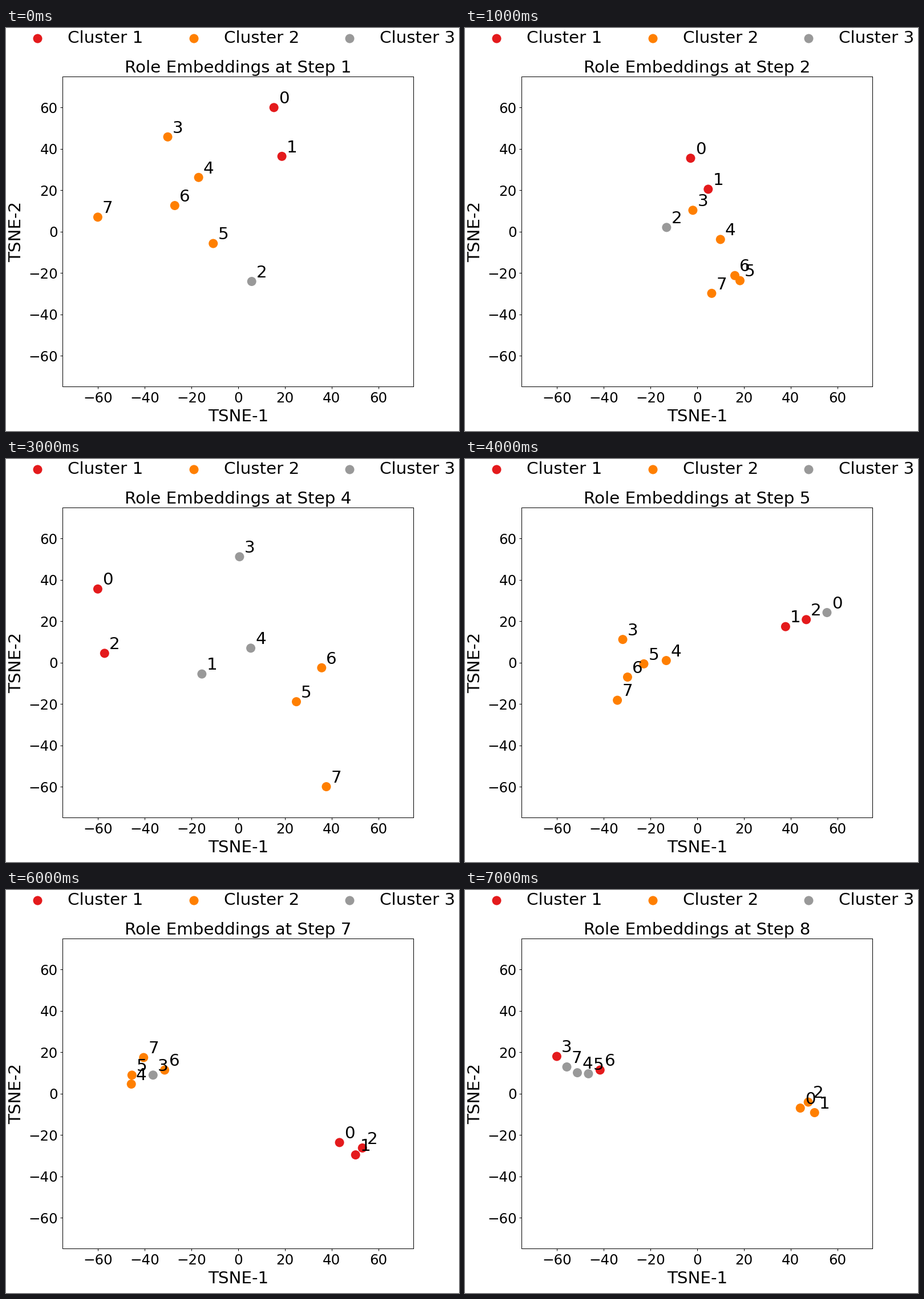
Animation, 794 px wide and 706 px high, one loop 8000 ms. Source, as a matplotlib script:

```python
import matplotlib.pyplot as plt
import numpy as np
from matplotlib.animation import FuncAnimation

W, H = 794, 706
DPI = 72  # one point equals one pixel
BIG, SMALL = 29.4, 24.5
DOT = 16 ** 2
COLORS = {"1": "#e41a1c", "2": "#ff7f00", "3": "#999999"}
N_STEPS = 8
DRIFT = 0.55  # how far a step without its own layout lies between its neighbours

# Per step: cluster of each role, then chains of roles spread evenly
# along the line or parabola through a few key points
LAYOUTS = {
    1: ("11322222", {"01": [(15.3, 60), (18.7, 36.4)],
                     "256": [(5.8, -24.1), (-27.1, 12.6)],
                     "43": [(-16.9, 26.2), (-30.1, 45.8)],
                     "7": [(-60, 7)]}),
    3: ("22233311", {"201": [(-28.5, 23.4), (-6.7, 7.5)],
                     "34567": [(21.3, -18.7), (42, -38.4), (60.4, -60)]}),
    4: ("13133222", {"02": [(-60, 35.6), (-57.1, 4.5)],
                     "14": [(-15.5, -5.5), (5.4, 7)],
                     "56": [(24.9, -18.9), (35.7, -2.5)],
                     "3": [(0.6, 51.2)],
                     "7": [(37.7, -60)]}),
    5: ("31122222", {"120": [(37.8, 17.4), (55.5, 24.2)],
                     "4567": [(-13.2, 1), (-26.6, -3.2), (-34.1, -18.2)],
                     "3": [(-31.8, 11.2)]}),
    6: ("11132222", {"012": [(42.4, -44), (50.2, -54.6), (60, -53.4)],
                     "54": [(-44.1, 8.1), (-38.9, -2.1)],
                     "763": [(-21.7, 23), (-19.1, 11.4), (-7.5, -2.1)]}),
    8: ("22213313", {"37456": [(-60, 18), (-51.2, 10.1), (-41.5, 11.4)],
                     "021": [(44.1, -7), (47.5, -4.1), (50.2, -9.2)]}),
}


def chain(keys, count):
    """Evenly spaced points on the polynomial curve through the keys."""
    basis = np.vander(np.linspace(0, 1, len(keys)))
    return np.vander(np.linspace(0, 1, count), len(keys)) @ np.linalg.solve(basis, keys)


def layout(step):
    """Clusters and positions of all roles at one step."""
    if step not in LAYOUTS:
        clusters, before = layout(step - 1)
        after = layout(step + 1)[1]
        return clusters, before + DRIFT * (after - before)
    clusters, chains = LAYOUTS[step]
    points = np.zeros((len(clusters), 2))
    for roles, keys in chains.items():
        points[[int(r) for r in roles]] = chain(keys, len(roles))
    return clusters, points


fig = plt.figure(figsize=(W / DPI, H / DPI), dpi=DPI, facecolor="white")


def put_text(x, y, text, **style):
    """Place text with its baseline at a pixel position from the top left."""
    return fig.text(x / W, 1 - y / H, text, fontsize=BIG, va="baseline", **style)


# Full-stage layer in pixel units for the legend dots
stage = fig.add_axes([0, 0, 1, 1])
stage.set(xlim=(0, W), ylim=(H, 0))
stage.axis("off")

ax = fig.add_axes([99.4 / W, 1 - 628.4 / H, 615 / W, 543.4 / H])
ax.set(xlim=(-75, 75), ylim=(-75, 75))
ticks = np.arange(-60, 61, 20)
ax.set_xticks(ticks)
ax.set_yticks(ticks)
ax.tick_params(labelsize=SMALL, length=4.3, width=1, pad=4.3)
for spine in ax.spines.values():
    spine.set_linewidth(1)

put_text(407, 689, "TSNE-1", ha="center")
put_text(26, 357, "TSNE-2", ha="center", rotation=90, rotation_mode="anchor")
title = put_text(407, 78, "", ha="center")

for i, (name, color) in enumerate(COLORS.items()):
    shift = 273.7 * i
    stage.scatter(55 + shift, 17.6, s=DOT, c=color, linewidths=0)
    put_text(108 + shift, 26, f"Cluster {name}")

dots = ax.scatter(np.zeros(8), np.zeros(8), s=DOT, linewidths=0, zorder=2)
labels = [ax.text(0, 0, str(i), fontsize=BIG, zorder=3) for i in range(8)]


def draw(frame):
    step = frame + 1
    clusters, points = layout(step)
    title.set_text(f"Role Embeddings at Step {step}")
    dots.set_offsets(points)
    dots.set_facecolor([COLORS[c] for c in clusters])
    for label, (x, y) in zip(labels, points):
        label.set_position((x + 2, y + 2))
    return [title, dots, *labels]


anim = FuncAnimation(fig, draw, frames=N_STEPS, interval=1000,
                     repeat=True, repeat_delay=0, blit=False)
plt.show()
```
